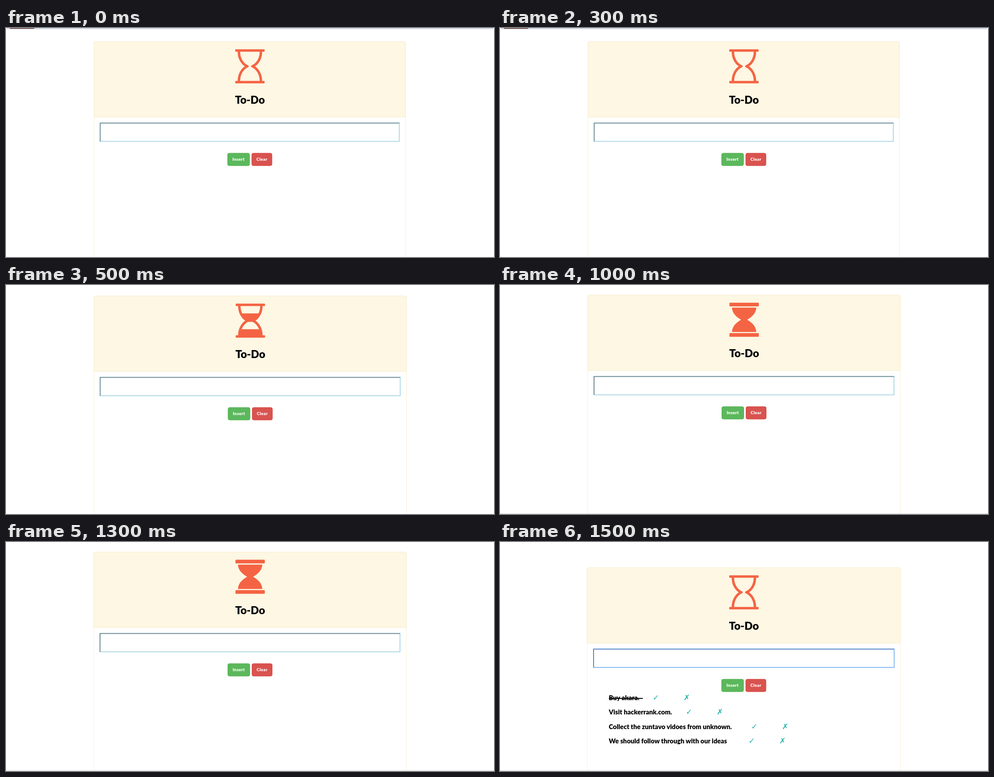
Animation, 1090 px wide and 514 px high, one loop 2000 ms. Source, as an HTML page:

```html
<!DOCTYPE html>
<html lang="en">
<head>
<meta charset="utf-8">
<title>To-Do</title>
<style>
  html, body { margin: 0; width: 100%; height: 100%; overflow: hidden; background: #fff; }
  svg { display: block; width: 1090px; height: 514px; }
  text { font-family: Lato, "Open Sans", sans-serif; font-weight: 900; }
  .mark { font-family: "DejaVu Sans", sans-serif; font-weight: 400; font-size: 17px; fill: #20b2aa; }
</style>
</head>
<body>
<svg id="stage" viewBox="0 0 1090 514" xmlns="http://www.w3.org/2000/svg"></svg>
<script>
const stage = document.getElementById('stage');
const STEP = 500;

// Each view: card edges and top, input edges, button start, icon start.
const views = [
  { left: 196.5, right: 892.5, top: 30.5, in0: 209.5, in1: 879.5, btn: 494.5, icon: 512, glass: 'empty', strip: true },
  { left: 196.5, right: 894.5, top: 24.5, in0: 209.5, in1: 881.5, btn: 495.5, icon: 513, glass: 'half' },
  { left: 196, right: 894, top: 22.5, in0: 209, in1: 881, btn: 495, icon: 512.5, glass: 'full', rule: true },
  { left: 195, right: 894.5, top: 57.5, in0: 208, in1: 881.5, btn: 494.5, icon: 512, glass: 'empty', rule: true, focus: true, list: true }
];

const tasks = [
  { label: 'Buy akara.', tick: 343, done: 319 },
  { label: 'Visit hackerrank.com.', tick: 417 },
  { label: 'Collect the zuntavo vidoes from unknown.', tick: 563 },
  { label: 'We should follow through with our ideas', tick: 557 }
];

const frame = `M1408 128q0 261-106.5 461.5t-266.5 306.5q160 106 266.5 306.5t106.5 461.5
  h96q32 0 32 32v64q0 32-32 32h-1472q-32 0-32-32v-64q0-32 32-32h96
  q0-261 106.5-461.5t266.5-306.5q-160-106-266.5-306.5t-106.5-461.5
  h-96q-32 0-32-32v-64q0-32 32-32h1472q32 0 32 32v64q0 32-32 32z`;

const glasses = {
  empty: frame + `M874 836q77-29 149-92.5t129.5-152.5 92.5-210 35-253h-1024
    q0 132 35 253t92.5 210 129.5 152.5 149 92.5q42 18 42 60t-42 60
    q-77 29-149 92.5t-129.5 152.5-92.5 210-35 253h1024
    q0-132-35-253t-92.5-210-129.5-152.5-149-92.5q-42-18-42-60t42-60z`,
  half: frame + `M1280 128h-1024q0 206 85 384h854q85-178 85-384z
    M1223 1344q-54-141-145.5-241.5t-194.5-142.5h-230q-103 42-194.5 142.5t-145.5 241.5z`,
  full: `M32 0h1472q32 0 32 32v128q0 32-32 32h-1472q-32 0-32-32v-128q0-32 32-32z
    M32 1600h1472q32 0 32 32v128q0 32-32 32h-1472q-32 0-32-32v-128q0-32 32-32z
    M130 256H1406C1380 600 1150 750 928 896C1150 1042 1380 1192 1406 1536H130
    C156 1192 386 1042 608 896C386 750 156 600 130 256z`
};

const rect = (x, y, w, h, fill, extra = '') =>
  `<rect x="${x}" y="${y}" width="${w}" height="${h}" fill="${fill}" ${extra}/>`;

const text = (x, y, size, label, extra = '') =>
  `<text x="${x}" y="${y}" font-size="${size}" ${extra}>${label}</text>`;

function button(x, y, w, label, fill, edge) {
  return rect(x + .5, y + .5, w - 1, 28, fill, `rx="3.5" stroke="${edge}"`) +
    text(x + w / 2, y + 17, 9.6, label, 'fill="#fff" text-anchor="middle" letter-spacing=".35"');
}

function field(v) {
  const y0 = v.top + 182, y1 = v.top + 225, { in0: a, in1: b } = v;
  const [dark, light] = v.focus ? ['#5584c4', '#7fb8ec'] : ['#6d8790', '#add8e6'];
  return rect(a, y0, b - a, y1 - y0, light, v.focus ? 'rx="1.5"' : '') +
    `<path d="M${a} ${y1}V${y0}H${b}l-2 2H${a + 2}V${y1 - 2}z" fill="${dark}"/>` +
    rect(a + 2, y0 + 2, b - a - 4, y1 - y0 - 4, '#fff');
}

function row(task, i) {
  const y = 355 + i * 32.3;
  return text(243, y, 14.5, task.label) +
    (task.done ? rect(243, y - 5, task.done - 243, 2, '#000') : '') +
    text(task.tick - 2, y, 17, '✓', 'class="mark"') +
    text(task.tick + 67, y, 17, '✗', 'class="mark"');
}

function draw(v) {
  const { left, right, top } = v, w = right - left, mid = v.icon + 32.8;
  const head = top + 169.5;
  let out = rect(0, 0, 1090, 514, '#fff');
  if (v.strip) {
    out += rect(2, 0, 1086, 1, '#e6f0f9') + rect(2, 1, 1086, 1.3, '#b9c7d6') +
      rect(9, 0, 54, 2, '#76574f');
  }
  out += rect(left, top, w, 520, '#fff', 'rx="3.5" stroke="#faefcf"');
  out += `<path d="M${left} ${head}V${top + 3.5}q0-3.5 3.5-3.5H${right - 3.5}q3.5 0 3.5 3.5V${head}z"
    fill="#fdf7e3" stroke="#faebcc"/>`;
  out += `<path transform="translate(${v.icon} ${top + 17.3}) scale(.0427)" d="${glasses[v.glass]}"
    fill="#f46444" fill-rule="evenodd"/>`;
  out += text(mid, top + 139.5, 24, 'To-Do', 'text-anchor="middle"');
  out += field(v);
  out += button(v.btn, top + 250, 50, 'Insert', '#5cb85c', '#4cae4c');
  out += button(v.btn + 54, top + 250, 46, 'Clear', '#d9534f', '#d43f3a');
  if (v.list) out += tasks.map(row).join('');
  if (v.rule) out += rect(0, 512.5, 1090, 1, '#d6d6d6');
  return out;
}

let shown = -1;
function update(t) {
  const i = Math.floor(t / STEP) % views.length;
  if (i !== shown) stage.innerHTML = draw(views[shown = i]);
}

const start = performance.now();
function loop() {
  update(performance.now() - start);
  requestAnimationFrame(loop);
}
loop();
</script>
</body>
</html>
```
